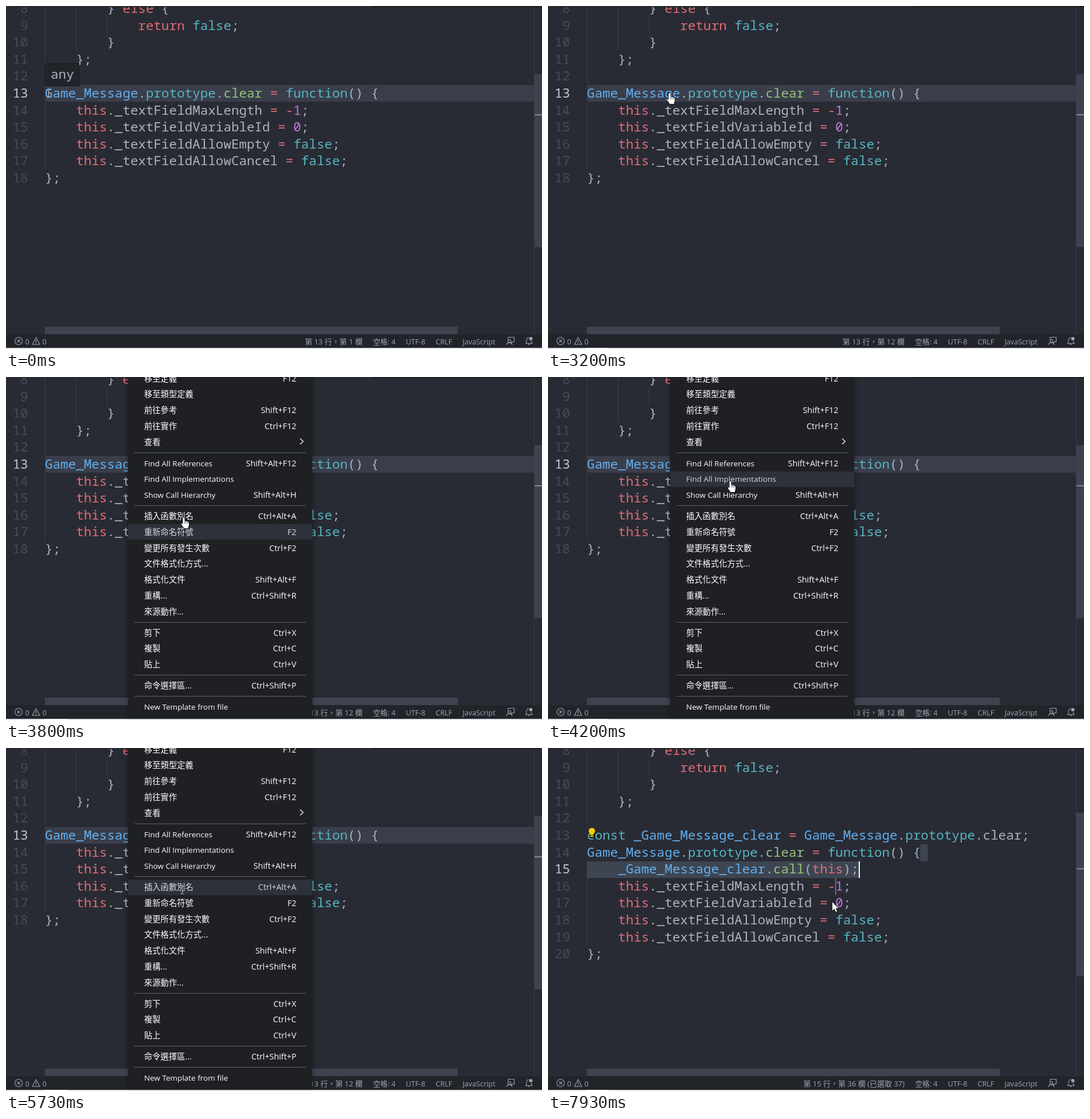
These frames come from a looping animation (935x599 px, 8000 ms). An HTML page with a canvas:

```html
<!DOCTYPE html>
<html lang="zh-Hant">
<head>
<meta charset="utf-8">
<title>Editor</title>
<style>
html, body { margin: 0; width: 100%; height: 100%; overflow: hidden; background: #292b34; }
canvas { display: block; }
</style>
</head>
<body>
<canvas id="stage" width="935" height="599"></canvas>
<script>
const ctx = document.getElementById('stage').getContext('2d');
const MONO = '22.57px "Noto Sans Mono", "DejaVu Sans Mono", monospace';
const UI = '"Open Sans", "Noto Sans CJK TC", "Noto Sans CJK", sans-serif';
const LEFT = 68, CHAR = 13.54, PITCH = 29.6;
const GREY = '#abb2bf';
const COLORS = ['#56b6c2', '#e06c75', '#61afef', '#98c379', '#c678dd'];
const TOKENS = /(const|function|prototype|false)|(this|return|else|=|-)|(_?Game_Message(?:_clear)?)|(clear(?= =)|call)|(\d)|\w+|[^\w\s]/g;

const head = ['        } else {', '            return false;', '        }', '    };', ''];
const method = 'Game_Message.prototype.clear = function() {';
const body = ['    this._textFieldMaxLength = -1;', '    this._textFieldVariableId = 0;',
  '    this._textFieldAllowEmpty = false;', '    this._textFieldAllowCancel = false;', '};'];
const before = [...head, method, ...body];
const after = [...head, 'const _Game_Message_clear = Game_Message.prototype.clear;', method,
  '    _Game_Message_clear.call(this);', ...body];

const menu = [
  ['移至定義|F12', '移至類型定義', '前往參考|Shift+F12', '前往實作|Ctrl+F12', '查看|>'],
  ['Find All References|Shift+Alt+F12', 'Find All Implementations', 'Show Call Hierarchy|Shift+Alt+H'],
  ['插入函數別名|Ctrl+Alt+A', '重新命名符號|F2', '變更所有發生次數|Ctrl+F2', '文件格式化方式...',
    '格式化文件|Shift+Alt+F', '重構...|Ctrl+Shift+R', '來源動作...'],
  ['剪下|Ctrl+X', '複製|Ctrl+C', '貼上|Ctrl+V'],
  ['命令選擇區...|Ctrl+Shift+P'],
  ['New Template from file']
];

// Pointer path: step (15 per second), x, y
const path = [
  [0, 74, 153], [2, 74, 153], [3, 270, 329], [10, 270, 329], [11, 262, 300], [12, 240, 235],
  [13, 220, 170], [14, 214, 155], [47, 214, 155], [48, 212, 152], [51, 212, 152], [52, 222, 158],
  [56, 304, 272], [57, 310, 245], [60, 318, 205], [63, 318, 182], [65, 318, 181], [66, 318, 185],
  [72, 312, 212], [75, 312, 212], [76, 310, 232], [77, 307, 246], [85, 307, 246], [86, 307, 248],
  [104, 307, 248], [105, 330, 247], [109, 505, 216], [111, 505, 216], [112, 490, 200],
  [114, 464, 162], [116, 476, 205], [118, 496, 252], [119, 496, 269]
];
const HAND = new Path2D('M-1.5 1Q0 -1 1.5 1V6.5L5 7 8 8.2 9 9.5V14L7.5 19H.5L-4 12.5Q-4 10 -2.5 10.8L-1.5 12Z');
const ARROW = new Path2D('M0 0V15L3.6 11.8 6 17.2 8.2 16.2 6 11H10.5Z');
const BEAM = new Path2D('M-3 -6.5H-1L0 -5.5 1 -6.5H3M0 -5.5V5.5M-3 6.5H-1L0 5.5 1 6.5H3');

function pointer(k) {
  const i = Math.max(1, path.findIndex(p => p[0] >= k));
  const [k0, x0, y0] = path[i - 1], [k1, x1, y1] = path[i];
  const f = (k - k0) / (k1 - k0);
  return [x0 + (x1 - x0) * f, y0 + (y1 - y0) * f];
}

function rect(x, y, w, h, color) {
  ctx.fillStyle = color;
  ctx.fillRect(x, y, w, h);
}

function text(s, x, y, color, font, align = 'left') {
  ctx.font = font;
  ctx.fillStyle = color;
  ctx.textAlign = align;
  ctx.fillText(s, x, Math.round(y));
}

function stroke(d, color, width = 1) {
  ctx.strokeStyle = color;
  ctx.lineWidth = width;
  ctx.stroke(new Path2D(d));
}

const colX = c => LEFT + c * CHAR;
const lineTop = n => Math.round(138 + (n - 13) * PITCH);

function guide(x, from, to) {
  rect(x, lineTop(from), 1, lineTop(to + 1) - lineTop(from), '#3a3e48');
}

function drawCode(lines, active) {
  lines.forEach((line, i) => {
    const n = i + 8, y = 160 + (n - 13) * PITCH;
    text(n, 38.5, y, n === active ? '#c6cad2' : '#454b59', MONO, 'right');
    for (const m of line.matchAll(TOKENS)) {
      const kind = m.slice(1).findIndex(Boolean);
      text(m[0], colX(m.index), y, COLORS[kind] || GREY, MONO);
    }
  });
}

function drawEditor(k) {
  const done = k >= 88;
  guide(68, 8, 12);
  guide(122, 8, 10);
  guide(176, 9, 9);
  if (done) {
    guide(68, 15, 19);
    ctx.fillStyle = '#3e4552';
    ctx.beginPath();
    ctx.roundRect(649, 168, 13.5, 30, 3);
    ctx.fill();
    rect(68, 198, 474, 29, '#3e4552');
    for (let c = 0; c < 4; c++) rect(colX(c + .5) - 1, 211, 2, 2, '#555c69');
  } else {
    guide(68, 14, 17);
    rect(68, 138, 853, 29, '#3a3e4b');
  }
  drawCode(done ? after : before, done ? 15 : 13);

  if (k >= 22 && k < 30 || k >= 37 && k < 44) rect(216, 138, 2, 29, '#fff');
  if (done && !(k >= 97 && k < 105 || k >= 112 && k < 119)) rect(542, 198, 2, 29, '#fff');
  if (k < 5 || k >= 20 && k < 22) {
    rect(68, 100, 60, 40, '#17191e');
    rect(69, 101, 58, 38, '#21252a');
    text('any', 78, 127, GREY, MONO);
  }
  if (k >= 94) drawBulb();

  rect(921, 0, 1, 573, '#3a3d47');
  rect(922, done ? 113 : 119, 13, done ? 286 : 302, '#3f424e');
  rect(922, done ? 210 : 189, 13, 2, '#858994');
  rect(68, 560, 720, 13, '#3f434f');
  rect(0, 0, 935, 2, '#1c1e23');
  rect(0, 0, 638, 1, '#3a3d46');
}

function drawBulb() {
  ctx.fillStyle = '#ffcc00';
  ctx.beginPath();
  ctx.arc(76.5, 145, 5.5, 0, 7);
  ctx.fill();
  rect(74, 149, 5, 3, '#ffcc00');
  rect(74, 153, 5, 2, '#ffcc00');
}

function drawStatus(k) {
  const ink = '#9da5b4', font = '12.6px ' + UI;
  rect(0, 573, 935, 24, '#21252a');
  rect(0, 597, 935, 2, '#dfe1e3');
  if (k >= 21) rect(66, 597, 40, 2, '#fff');
  stroke('M15.5 585a6.5 6.5 0 1 0 13 0a6.5 6.5 0 1 0 -13 0M19.5 582.5l5 5m0 -5l-5 5', ink, 1.1);
  stroke('M52.5 579L46 591H59ZM52.5 583V587M52.5 588V589.5', ink, 1.1);
  text('0', 33.5, 591, ink, font);
  text('0', 63.5, 591, ink, font);
  const place = k < 22 ? '第 13 行，第 1 欄' : k < 90 ? '第 13 行，第 12 欄' : '第 15 行，第 36 欄 (已選取 37)';
  text(place, 622, 591, ink, '13px ' + UI, 'right');
  text('空格: 4', 640.5, 591, ink, font);
  text('UTF-8', 697.5, 591, ink, font);
  text('CRLF', 749.5, 591, ink, font);
  text('JavaScript', 796.5, 591, ink, font);
  stroke('M876 582V578.5H886.5V586.5H884L881.5 589V586.5M875.5 585a2.5 2.5 0 1 0 5 0a2.5 2.5 0 1 0 -5 0M873 592Q873.5 588 878 588T883 592', ink, 1.1);
  stroke('M912 579Q908 579.5 908 584V587L906.5 589.5H918L916.5 587V585M910.5 590Q912 593 914 590', ink, 1.1);
  ctx.fillStyle = ink;
  ctx.beginPath();
  ctx.arc(915.5, 581, 3, 0, 7);
  ctx.fill();
}

function drawMenu(k) {
  const [px, py] = pointer(k - 1);
  ctx.save();
  ctx.shadowColor = 'rgba(0,0,0,.5)';
  ctx.shadowBlur = 7;
  rect(213, -10, 321, 603, '#1e2024');
  ctx.restore();
  let y = 2.5;
  menu.forEach((group, g) => {
    if (g) {
      y += 9.25;
      rect(224, Math.floor(y - 18.5), 299, 1, '#606368');
    }
    for (const item of group) {
      const [label, keys] = item.split('|');
      const hot = px > 213 && Math.abs(py - y) < 13.9;
      const ink = hot ? '#d7dae0' : '#fff';
      if (hot) rect(213, Math.round(y - 13.5), 321, 27, '#2c313a');
      const size = /[a-z]/.test(label) ? 13.5 : 14.3;
      text(label, 241, y + 5, ink, size + 'px ' + UI);
      if (keys === '>') stroke('M513 107.5L518.5 112.5 513 117.5', ink, 1.2);
      else if (keys) text(keys, 506.5, y + 5, ink, '14.3px ' + UI, 'right');
      y += 27.75;
    }
  });
}

function drawPointer(k) {
  const [x, y] = pointer(k);
  if (k >= 113) {
    // Drop position trails the pointer by one step
    const [dx, dy] = pointer(k - 1);
    const cx = Math.round(colX(Math.round((dx - LEFT) / CHAR)));
    const top = lineTop(Math.floor((dy - 138) / PITCH) + 13);
    for (let i = 0; i < 29; i += 3) rect(cx, top + i, 1.5, 1.5, '#d0d3d8');
  }
  ctx.save();
  ctx.translate(x, y);
  if (k >= 48 && k < 86 || k >= 108) {
    const shape = k < 86 ? HAND : ARROW;
    ctx.strokeStyle = '#111';
    ctx.lineWidth = 1.6;
    ctx.stroke(shape);
    ctx.fillStyle = '#fff';
    ctx.fill(shape);
    if (k < 86) {
      ctx.lineWidth = .7;
      ctx.stroke(new Path2D('M1.7 7V11M4.2 7.5V11M6.7 8.3V11'));
    }
  } else {
    ctx.translate(.5, 0);
    ctx.strokeStyle = '#d4d6da';
    ctx.lineWidth = 1;
    ctx.stroke(BEAM);
  }
  ctx.restore();
}

function draw(now) {
  const k = Math.floor((now % 8000 + 4) * .015) % 120;
  rect(0, 0, 935, 599, '#292b34');
  drawEditor(k);
  drawStatus(k);
  if (k >= 49 && k < 87) drawMenu(k);
  drawPointer(k);
}

const start = performance.now();
function tick() {
  draw(performance.now() - start);
  requestAnimationFrame(tick);
}
tick();
</script>
</body>
</html>
```
